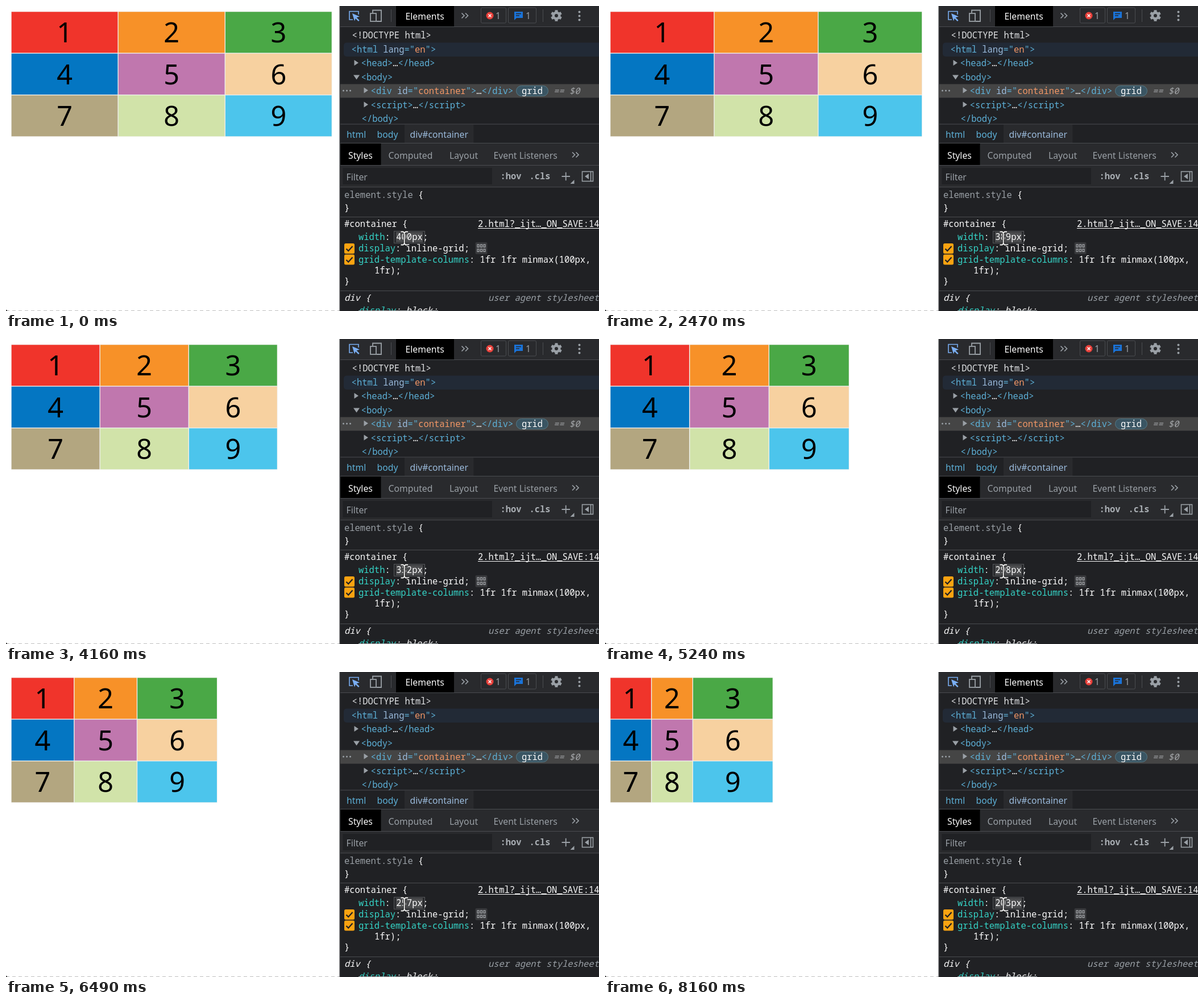
An HTML page for the animation above (8680 ms loop, 1043x537 px).

```html
<!DOCTYPE html>
<html lang="en">
<head>
<meta charset="utf-8">
<title>Grid columns with minmax</title>
<style>
html, body { margin: 0; width: 100%; height: 100%; overflow: hidden; background: #fff; }
svg { display: block; }
text { white-space: pre; }
.ui { font: 15.75px "Noto Sans", "Open Sans", sans-serif; }
.mono { font: 500 15.48px "Noto Sans Mono", "DejaVu Sans Mono", monospace; }
.num { font: 48.6px "Noto Sans", "Open Sans", sans-serif; text-anchor: middle; }
.it { font-style: italic; font-weight: 400; }
.bold { font-weight: 600; }
</style>
</head>
<body>
<svg id="stage" width="1043" height="537" viewBox="0 0 1043 537"></svg>
<script>
const NS = 'http://www.w3.org/2000/svg';
const stage = document.getElementById('stage');

function add(tag, attrs, label) {
  const el = document.createElementNS(NS, tag);
  for (const k in attrs) el.setAttribute(k, attrs[k]);
  if (label !== undefined) el.textContent = label;
  stage.appendChild(el);
  return el;
}
const rect = (x, y, width, height, fill, more) => add('rect', { x, y, width, height, fill, ...more });
const line = (d, stroke, w = 1, more) => add('path', { d, stroke, 'stroke-width': w, fill: 'none', ...more });
const shape = (d, fill) => add('path', { d, fill });
const label = (cls, x, y, fill, str) => add('text', { class: cls, x, y, fill }, str);
const ui = (x, y, fill, str) => label('ui', x, y, fill, str);

// Mono text made of [colour, string] runs
function code(x, y, runs, cls = '') {
  const t = label('mono ' + cls, x, y, '#fff', '');
  for (const [fill, str] of runs) {
    const s = document.createElementNS(NS, 'tspan');
    s.setAttribute('fill', fill);
    s.textContent = str;
    t.appendChild(s);
  }
  return t;
}

const WHITE = '#fbfbfb', GREY = '#9aa0a6', EDGE = '#4a4c50', BAR = '#292a2d';
const TAG = '#5db0d7', ATTR = '#9bbbdc', VALUE = '#f29766', PROP = '#35d4c7';

// ---- Page with the grid ----
const SCALE = 1.411, LEFT = 9, TOP = 9.6, ROW = 73.5, GAP = 0.7;
const COLORS = ['#f0342b', '#f79128', '#4aa846', '#0476c2', '#c077ae', '#f7d1a0',
  '#b3a680', '#d1e3a9', '#4cc5ec'];
rect(0, 0, 1043, 537, '#fff');
const frame = rect(LEFT, TOP, 0, ROW * 3, '#eeeeec');
const cells = COLORS.map((fill, i) => {
  const row = Math.floor(i / 3);
  return {
    box: rect(0, TOP + row * ROW + GAP, 0, ROW - 2 * GAP, fill),
    num: label('num', 0, 64.3 + row * ROW, '#000', i + 1)
  };
});
line('M0 536.5H587', '#bdbdbd', 1, { 'stroke-dasharray': '6 5' });
rect(0, 535, 2, 2, '#444');

// ---- Panel background ----
rect(587, 0, 456, 537, '#202124');
rect(586.5, 0, 1.5, 537, '#3b3c3f');

// ---- Toolbar ----
rect(588, 0, 455, 36, BAR);
rect(588, 36, 455, 1, EDGE);
line('M620 15V9.5H604V24H610', '#7aaef2', 1.6);
shape('M609 13L622 18.5L616.6 20.2L621.6 25.2L619.8 27L614.8 22L613 26.5Z', '#7aaef2');
line('M645 12V7.5H660V27H652', GREY, 1.8);
rect(641, 13, 10, 14, BAR, { stroke: GREY, 'stroke-width': 1.8 });
rect(677, 6, 1, 22, EDGE);
rect(686, 0, 102, 36, '#000');
ui(702.5, 24, WHITE, 'Elements');
const more = (x, y) => line(`M${x} ${y - 4.5}l4.5 4.5l-4.5 4.5m6.5 -9l4.5 4.5l-4.5 4.5`, GREY, 1.7);
more(801.5, 17);
for (const [x, w] of [[835.5, 44], [883.5, 49]])
  rect(x, 3, w, 27, 'none', { stroke: EDGE, rx: 2 });
add('circle', { cx: 851, cy: 17, r: 6.5, fill: '#e8403a' });
line('M848.5 14.5l5 5m0 -5l-5 5', '#fff', 1.5);
ui(861, 23, GREY, '1');
shape('M894 10H909V21H898L894 25Z', '#1a73d8');
line('M897 13.5H906M897 17H903', BAR, 1.4);
ui(914, 23, GREY, '1');
rect(944, 6, 1, 22, EDGE);
add('circle', { cx: 968, cy: 17, r: 5.3, fill: 'none', stroke: GREY, 'stroke-width': 4.6 });
for (let a = 0; a < 360; a += 60)
  rect(965.5, 7.2, 5, 4, GREY, { transform: `rotate(${a} 968 17)` });
for (const y of [10.5, 17.5, 24.5]) add('circle', { cx: 1008.5, cy: y, r: 2, fill: GREY });

// ---- Element tree ----
rect(594, 64.5, 455, 24.5, '#222a36', { rx: 5 });
rect(588, 137.5, 455, 24, '#454545');
code(608.6, 57.4, [['#e2e4e6', '<!DOCTYPE html>']]);
code(607.6, 82.4, [[TAG, '<html '], [ATTR, 'lang'], [TAG, '="'], [VALUE, 'en'], [TAG, '">']]);
code(624.6, 106.4, [[TAG, '<head>'], [WHITE, '…'], [TAG, '</head>']]);
code(624.6, 131, [[TAG, '<body>']]);
code(641.6, 155, [[TAG, '<div '], [ATTR, 'id'], [TAG, '="'], [VALUE, 'container'], [TAG, '">'],
  [WHITE, '…'], [TAG, '</div>']]);
code(641.6, 180, [[TAG, '<script>'], [WHITE, '…'], [TAG, '<\/script>']]);
code(625.6, 204.4, [[TAG, '</body>']]);
for (const [x, y] of [[612.5, 100], [629.5, 148.5], [629.5, 173.5]])
  shape(`M${x} ${y - 5}l7.5 5l-7.5 5Z`, GREY);
shape('M611 121.5h11l-5.5 8Z', GREY);
for (const x of [593.5, 599.5, 605.5]) add('circle', { cx: x, cy: 149, r: 1.5, fill: GREY });
rect(897.5, 140.5, 56, 18, '#3a5563', { rx: 9, stroke: '#557986' });
code(907, 155, [[WHITE, 'grid']]);
code(963, 155, [['#a4a6a9', '== $0']], 'it');

// ---- Breadcrumbs and tabs ----
rect(588, 208, 455, 34, '#202124');
rect(588, 207.5, 455, 1, EDGE);
rect(701, 209, 121.5, 32, BAR);
ui(599, 232, TAG, 'html');
ui(652.5, 232, TAG, 'body');
ui(710.5, 232, ATTR, 'div#container');
rect(588, 241, 455, 78, BAR);
rect(588, 241, 455, 1, EDGE);
rect(588.5, 242, 71, 38, '#000');
rect(588, 280, 455, 1, EDGE);
ui(602, 269, WHITE, 'Styles');
ui(672.5, 269, GREY, 'Computed');
ui(780, 269, GREY, 'Layout');
ui(857.5, 269, GREY, 'Event Listeners');
more(996, 262);

// ---- Filter row ----
rect(592.5, 285, 262.5, 29, '#202124');
ui(598.5, 307, GREY, 'Filter');
code(869.5, 305, [['#a8adb2', ':hov']], 'bold');
code(920.5, 305, [['#a8adb2', '.cls']], 'bold');
line('M977.5 300H992M984.7 292.7V307.3', GREY, 1.8);
shape('M999.5 306V313H992.5Z', GREY);
rect(1013.5, 291.5, 19, 17, 'none', { stroke: GREY, 'stroke-width': 1.6 });
line('M1028.5 291.5V308.5', GREY, 1.6);
shape('M1025 295V305L1018 300Z', GREY);
rect(588, 318.3, 455, 1, EDGE);

// ---- Style rules ----
code(595, 338, [[GREY, 'element.style '], [WHITE, '{']]);
code(595, 361, [[WHITE, '}']]);
rect(588, 371, 455, 1, EDGE);
code(595, 389.4, [[WHITE, '#container {']]);
code(830, 389.4, [[WHITE, '2.html?_ijt…_ON_SAVE:14']]);
rect(830, 391, 213, 1, WHITE);
code(620, 412, [[PROP, 'width'], [WHITE, ':']]);
rect(682.5, 396.5, 54, 21, '#28292c', { stroke: '#55575a' });
rect(686, 398, 47, 18, '#4b4c4e');
const field = label('mono', 686.3, 412, WHITE, '');
code(733, 412, [[WHITE, ';']]);
code(620, 432, [[PROP, 'display'], [WHITE, ': inline-grid;']]);
rect(825.5, 416, 21, 21, '#37383b', { rx: 2 });
for (const x of [829, 834.5, 840])
  for (const y of [420, 428])
    rect(x, y, 3, 4.5, 'none', { stroke: '#a8abaf', 'stroke-width': 1.2 });
code(620, 452, [[PROP, 'grid-template-columns'], [WHITE, ': 1fr 1fr minmax(100px,']]);
code(648, 471, [[WHITE, '1fr);']]);
code(595, 490, [[WHITE, '}']]);
for (const y of [418, 437.5]) {
  rect(595, y, 18, 18, '#fca311', { rx: 2.5 });
  line(`M598.5 ${y + 9.5}l3.7 3.7l7.3 -8.2`, '#202124', 2.3);
}
rect(588, 501, 455, 1, EDGE);
code(595, 519, [[WHITE, 'div {']], 'it');
code(848, 519, [[GREY, 'user agent stylesheet']], 'it');
code(620, 541, [[PROP, 'display'], [WHITE, ': block;']], 'it');
rect(620, 536, 140, 1, '#aeb4b6');

// ---- Text cursor ----
const beam = 'M694.5 397.5H698.5L700.7 399.5L703 397.5H707M700.7 399.5V418.5'
  + 'M694.5 420.5H698.5L700.7 418.5L703 420.5H707';
line(beam, '#222', 4.2);
line(beam, '#f4f4f4', 1.9);

// ---- Motion: key repeat lowers the width ----
const LOOP = 8680;
const RUNS = [[2140, 2990, 22], [3020, 3860, 22], [3890, 4750, 23], [4780, 5640, 22],
  [5690, 6540, 22], [6570, 7400, 22], [7450, 8160, 19]];
const KEYS = [[2140, 398], [2470, 389], [4160, 332], [5240, 298], [6490, 257], [7240, 233], [8160, 203]];

// Latest repaint moment at or before t
function snap(t) {
  const [a, b, n] = RUNS.filter(r => t >= r[0]).pop();
  const step = (b - a) / (n - 1);
  return a + step * Math.min(n - 1, Math.floor((t - a) / step + 0.3));
}

function widthAt(t) {
  if (t < 1650) return 400;
  if (t < 2140) return 399;
  const s = snap(t);
  const i = Math.max(1, KEYS.findIndex(k => s <= k[0]));
  const [t0, v0] = KEYS[i - 1], [t1, v1] = KEYS[i];
  return Math.round(v0 + (v1 - v0) * (s - t0) / (t1 - t0));
}

let shown;
function draw(t) {
  const w = widthAt(t);
  if (w === shown) return;
  shown = w;
  field.textContent = w + 'px';
  const last = Math.max(100, w / 3);
  const col = (w - last) / 2;
  const edges = [0, col, 2 * col, w].map(v => LEFT + v * SCALE);
  frame.setAttribute('width', w * SCALE);
  cells.forEach(({ box, num }, i) => {
    const a = edges[i % 3], b = edges[i % 3 + 1];
    box.setAttribute('x', a + GAP);
    box.setAttribute('width', b - a - 2 * GAP);
    num.setAttribute('x', (a + b) / 2);
  });
}

const start = performance.now();
function tick() {
  draw((performance.now() - start) % LOOP);
  requestAnimationFrame(tick);
}
tick();
</script>
</body>
</html>
```
